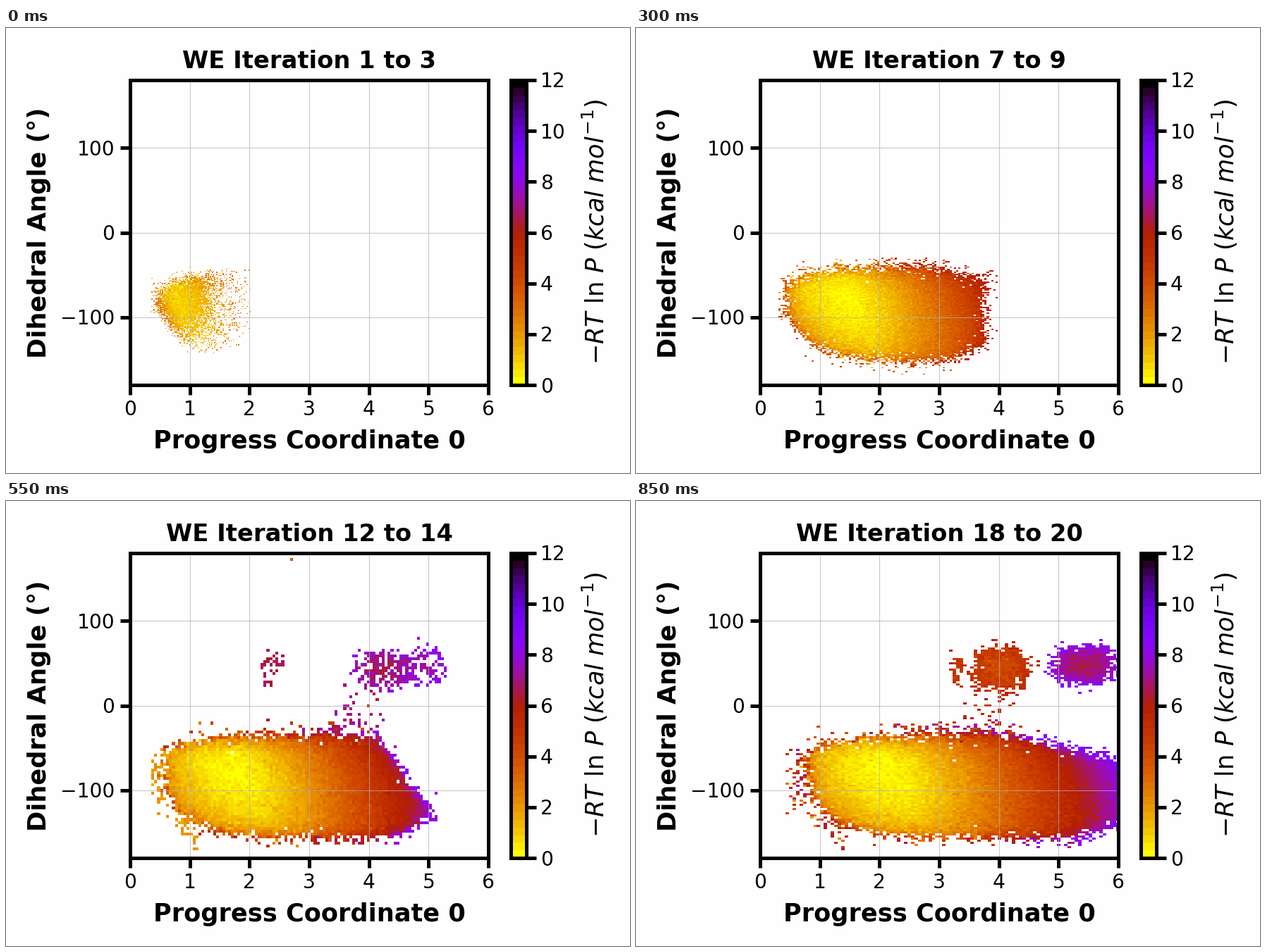
A matplotlib script that plays this animation: 885x632 px, repeating every 0.9 s.

```python
import numpy as np
import matplotlib
import matplotlib.pyplot as plt
from matplotlib.animation import FuncAnimation

W, H, DPI = 885, 632, 100
PT = 72 / DPI                     # points per pixel
FRAMES, INTERVAL = 18, 50
BINS = 100
LONE_ITERATION = 13               # one far walker stretches the bins
INK, PAPER = "black", "#fefefe"
CMAP = matplotlib.colormaps["gnuplot_r"].resampled(40)

plt.rcParams["font.family"] = "DejaVu Sans"
plt.rcParams["mathtext.fontset"] = "dejavusans"


def sigmoid(v):
    return 1 / (1 + np.exp(-np.clip(v, -50, 50)))


def ramp(t, start, end, a=0, b=1):
    """Move linearly from a to b while t runs from start to end."""
    return a + (b - a) * np.clip((t - start) / (end - start), 0, 1)


def bump(t, centre, width):
    return np.exp(-((t - centre) / width) ** 2)


def band_ends(t):
    left = ramp(t, 8, 16, .43, .8)
    right = 1.95 + .34 * t - .0055 * t ** 2
    return left, right


def bin_centres(t, lone):
    left, right = band_ends(t)
    xa = left - ramp(t, 8, 16, .12, .38)
    xb = right + .1 + .015 * t if t < 12 else 6.25
    ya = ramp(t, 0, 4, -155, -171)
    yb = -33 + 2 * t if t < 9 else 44 + 2 * t
    if lone:
        yb = 174
    step = (np.arange(BINS) + .5) / BINS
    X, Y = np.meshgrid(xa + step * (xb - xa), ya + step * (yb - ya))
    return X, Y, (xa, xb, ya, yb)


def band_depth(t, X, Y):
    """Distance inside the sampled band in degrees, negative outside."""
    left, right = band_ends(t)
    inset = np.maximum(X - left, 0)
    front = np.clip(1 - (right - X) / .9, 0, 1)
    top = (ramp(t, 0, 11, -46, -33) - 22 * np.exp(-inset / .5)
           - 12 * np.maximum(X - 4, 0) - 75 * front * bump(t, 11, 4))
    low = (ramp(t, 0, 10, -148, -158) + 60 * np.exp(-inset / .45)
           + 25 * front ** 2)
    return np.minimum.reduce([top - Y, Y - low,
                              (X - left) * 80, (right - X) * 80])


def band_energy(t, X, Y):
    """A basin whose floor follows the walkers and climbs to the front."""
    left, right = band_ends(t)
    centre = .8 + 1.4 * ramp(t, 0, 16) ** .7
    ahead = X + .006 * (Y + 75) - centre
    climb = np.clip(ahead / (right - centre), 0, 1.1) ** 1.2
    back = np.clip(-ahead / (centre - left), 0, 1.1) ** 2
    floor = (ramp(t, 0, 4, .8, .2) + ramp(t, 0, 12, 2.2, 8.2) * climb
             + 1.5 * back)
    off = (Y + 75) / np.where(Y > -75, 38, 72)
    return floor + 1.25 * off ** 2 / (1 + floor / 3)


def clouds(t):
    """Islands as (cx, cy, rx, ry, density, energy, rise to the rim)."""
    if t < 9:
        return
    grow = ramp(t, 10, 14)
    yield (ramp(t, 11, 16, 4.25, 4.02), 43, .48 + .1 * bump(t, 13, 1.5),
           ramp(t, 11, 17, 22, 27), .5 + .5 * grow,
           ramp(t, 11, 15, 6.7, 4.2), .9)
    yield (ramp(t, 10, 14, 4.8, 5.3) + ramp(t, 15, 17, 0, .12),
           46 + ramp(t, 13, 17, 0, 2), .55 + .25 * bump(t, 14.5, 2), 23,
           .25 + .75 * grow, ramp(t, 11, 16, 7.3, 6.6), 1.7)
    yield 3.85, 0, .4, 28, .13, ramp(t, 11, 15, 6.8, 5.4), .3
    if t < 14:
        yield 2.38, 45, .17, 22, .3, 6.5, .2
    if t > 15:
        yield 3.32, 42, .12, 17, .65, 4.8, .3


def energy_map(t):
    """Histogram of energies with NaN in the empty bins, and its extent."""
    rng = np.random.default_rng(100 + t)
    lone = t + 1 <= LONE_ITERATION <= t + 3
    X, Y, extent = bin_centres(t, lone)
    shape = X.shape
    grid = np.full(shape, np.inf)

    def deposit(chance, energy):
        hit = rng.random(shape) < chance
        np.minimum(grid, energy, out=grid, where=hit)

    # main band, which starts as a thin core and fills up
    depth = band_depth(t, X, Y)
    rim = np.exp(-np.maximum(depth, 0) / 6)
    energy = band_energy(t, X, Y) + ramp(t, 0, 11, .5, 2.3) * rim
    energy += rng.normal(0, 1, shape) * (.2 + .75 * rim)
    core = bump(X, .88, .5) * bump(np.maximum(np.abs(Y + 70) - 10, 0), 0, 50)
    cover = np.minimum(1.15 * core + ramp(t, 0, 4, .08, 1), 1)
    deposit(cover * sigmoid(depth / 3.1), energy)

    # loose fringes at the rear corner and along the top
    left, _ = band_ends(t)
    halo = .35 * sigmoid((depth + 24) / 4) * ramp(t, 7, 11)
    rear = (X < left + .6) & (Y < -50)
    deposit(halo * rear, rng.uniform(1.6, ramp(t, 11, 15, 2.4, 7.2), shape))
    crest = bump(X, 3.3, .9) * sigmoid((depth + 11) / 3) * ramp(t, 7, 11)
    deposit(.25 * crest * (Y > -50), rng.uniform(4, 7.8, shape))

    for cx, cy, rx, ry, density, level, rise in clouds(t):
        r = (np.abs((X - cx) / rx) ** 2.5 + np.abs((Y - cy) / ry) ** 2.5) ** .4
        deposit(density * sigmoid((1 - r) * 10),
                level + rise * r ** 2 + rng.normal(0, .3, shape))

    if lone:
        grid[-1, np.abs(X[0] - 2.72).argmin()] = 3.6
    cap = ramp(t, 0, 12, 2.9, 8.8)
    return np.where(np.isinf(grid), np.nan, np.clip(grid, .05, cap)), extent


def add_axes(x0, x1, y0, y1):
    ax = fig.add_axes([x0 / W, 1 - y1 / H, (x1 - x0) / W, (y1 - y0) / H])
    ax.set_facecolor(PAPER)
    for spine in ax.spines.values():
        spine.set_linewidth(5 * PT)
    ax.tick_params(length=14 * PT, width=5 * PT, labelbottom=False,
                   labelleft=False, labelright=False)
    return ax


def add_image(ax, data, extent):
    return ax.imshow(data, cmap=CMAP, vmin=0, vmax=12, origin="lower",
                     aspect="auto", interpolation="nearest", extent=extent)


def label(x, y, text, size, **kw):
    """Text on a baseline given in pixels from the top left."""
    return fig.text(x / W, 1 - y / H, text, fontsize=size * PT, color=INK,
                    va="baseline", rotation_mode="anchor", **kw)


fig = plt.figure(figsize=(W / DPI, H / DPI), dpi=DPI, facecolor=PAPER)
LEFT, RIGHT, TOP, BOTTOM = 176, 684, 74, 507
MIDX, MIDY = (LEFT + RIGHT) / 2, (TOP + BOTTOM) / 2
TICK, LABEL, TITLE = 28.1, 35.1, 33.8

ax = add_axes(LEFT, RIGHT, TOP, BOTTOM)
heat = add_image(ax, np.full((BINS, BINS), np.nan), (0, 6, -180, 180))
ax.set(xlim=(0, 6), ylim=(-180, 180), xticks=range(7), yticks=(-100, 0, 100))
ax.set_axisbelow("line")
ax.grid(color="#b0b0b0", alpha=.7, linewidth=1.1 * PT)

bar = add_axes(715.5, 737.5, TOP, BOTTOM)
add_image(bar, np.linspace(0, 12, 400)[:, None], (0, 1, 0, 12))
bar.set(xticks=[], yticks=range(0, 13, 2))
bar.yaxis.tick_right()
bar.tick_params(labelright=False)

for n in range(7):
    label(LEFT + n * (RIGHT - LEFT) / 6, 550, str(n), TICK, ha="center")
for n in (-100, 0, 100):
    y = MIDY - n * (BOTTOM - TOP) / 360
    label(154, y + 10.5, str(n).replace("-", "\u2212"), TICK, ha="right")
for n in range(0, 13, 2):
    y = BOTTOM - n * (BOTTOM - TOP) / 12
    label(758, y + 10.5, str(n), TICK, ha="left")

title = label(MIDX, 57, "", TITLE, ha="center", weight="bold")
label(MIDX, 597, "Progress Coordinate 0", LABEL, ha="center", weight="bold")
label(57, MIDY, "Dihedral Angle (\u00b0)", LABEL, ha="center",
      weight="bold", rotation=90)
label(849, MIDY - 1, r"$-RT\ \ln\, P\ (kcal\ mol^{-1})$", LABEL, ha="center",
      rotation=90)


def draw(frame):
    grid, extent = energy_map(frame)
    heat.set_data(np.ma.masked_invalid(grid))
    heat.set_extent(extent)
    ax.set(xlim=(0, 6), ylim=(-180, 180))
    title.set_text(f"WE Iteration {frame + 1} to {frame + 3}")
    return heat, title


anim = FuncAnimation(fig, draw, frames=FRAMES, interval=INTERVAL,
                     repeat=True, repeat_delay=0, blit=False)
plt.show()
```
